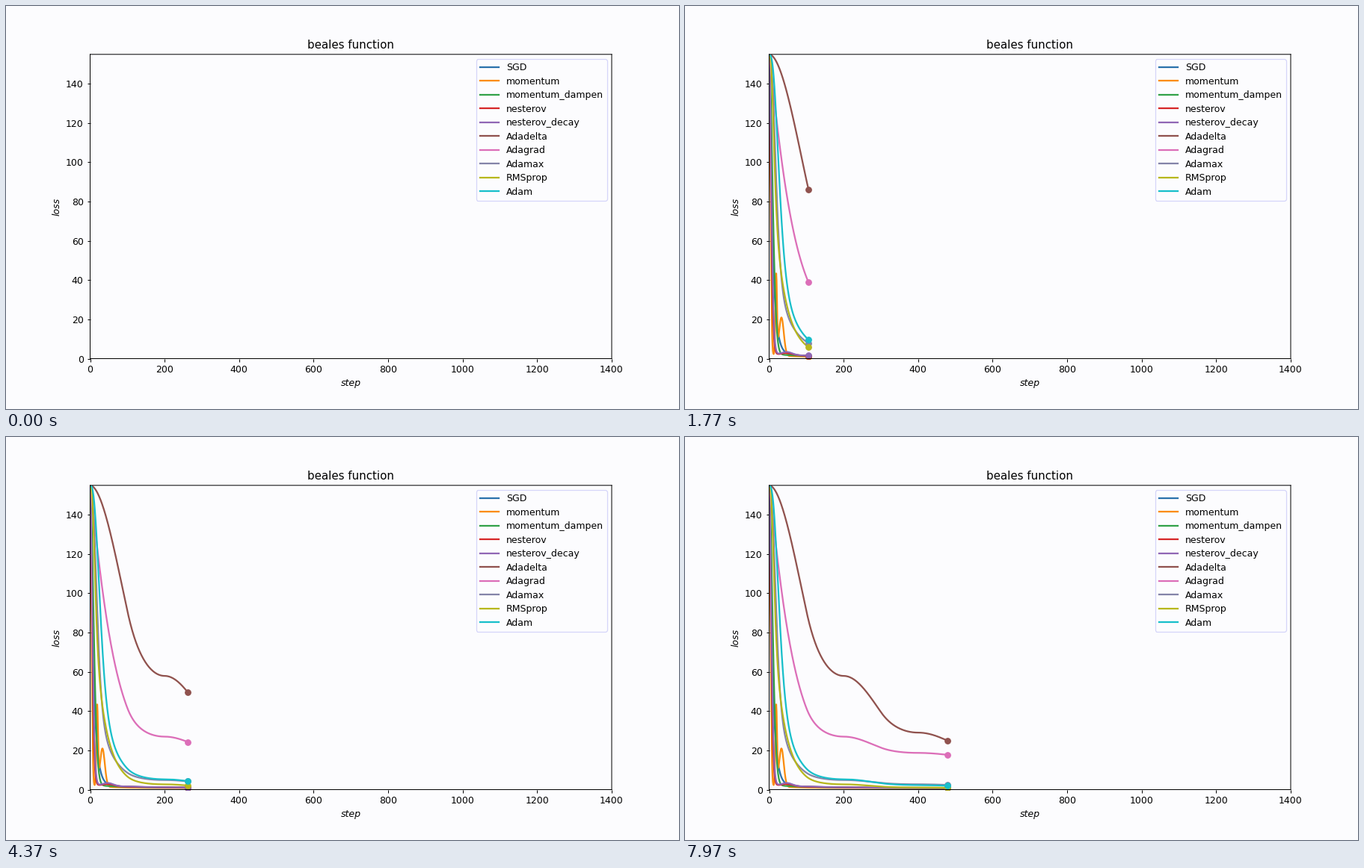
Recreate the animation shown at these times as a matplotlib script. Size 900 by 540 pixels, loop 8000 ms.

```python
import numpy as np
import matplotlib.pyplot as plt
from matplotlib.animation import FuncAnimation

FRAMES = 240
STEPS_PER_FRAME = 2
START = 155
PAPER = "#fcfcfe"

steps = np.arange(FRAMES * STEPS_PER_FRAME + 1)

# Learning rate is a triangle wave of period 200; progress is its integral.
cycle, phase = np.divmod(steps / 200, 1)
progress = cycle + np.where(phase < 0.5, 2 * phase**2, 1 - 2 * (1 - phase)**2)


def adaptive(floor, rate, power, warm=1):
    """Loss that falls with the cyclic learning rate after a short warm-up."""
    ramp = 1 - np.exp(-(steps / warm) ** 2)
    return floor + (START - floor) * np.exp(-rate * progress**power * ramp)


def plunge(scale, power, extra, tail, floor=0.8):
    """Fast fall from the start value onto a slowly sinking floor."""
    rest = floor + extra * np.exp(-steps / tail)
    return rest + (START - floor - extra) * np.exp(-(steps / scale) ** power)


def bump(center, width, height):
    return height * np.exp(-((steps - center) / width) ** 2)


swings = bump(19, 3, 40) + bump(33, 9, 19.5)

curves = [
    ("SGD", "#2a72ac", plunge(9.2, 1, 1.8, 110)),
    ("momentum", "#fb8c0c", plunge(5.2, 2.2, 1.2, 60) + swings),
    ("momentum_dampen", "#32a248", plunge(12.5, 1.8, 1.6, 110)),
    ("nesterov", "#d62728", plunge(6.8, 1.6, 1.4, 140) + bump(48, 22, 1)),
    ("nesterov_decay", "#9067b5",
     plunge(8, 1.7, 1.5, 150) + bump(48, 20, 1.5)),
    ("Adadelta", "#90524e", adaptive(14.5, 1.174, 0.95)),
    ("Adagrad", "#dc6eb8", adaptive(15, 2.457, 0.563)),
    ("Adamax", "#8484a8", adaptive(1, 3.68, 0.29, warm=24)),
    ("RMSprop", "#b7b71c", adaptive(0.6, 4.3, 0.41, warm=14)),
    ("Adam", "#18bfca", adaptive(0.6, 3.5, 0.36, warm=33)),
]

plt.rcParams["font.family"] = "DejaVu Sans"
fig = plt.figure(figsize=(10, 6), dpi=90, facecolor=PAPER)
ax = fig.add_axes([0.125, 0.125, 0.775, 0.755], facecolor=PAPER)
ax.set_xlim(0, 1400)
ax.set_ylim(0, START)
ax.set_title("beales function")
ax.set_xlabel("step", style="italic")
ax.set_ylabel("loss", style="italic")
for spine in ax.spines.values():
    spine.set_snap(False)

lines = [ax.plot([], [], color=color, lw=1.8, label=name)[0]
         for name, color, _ in curves]
dots = [ax.plot([], [], "o", color=color, ms=6)[0] for _, color, _ in curves]
ax.legend(loc="upper right", labelspacing=0.44, facecolor=PAPER,
          edgecolor="#ccccf8")


def draw(i):
    n = i * STEPS_PER_FRAME
    shown = n + 1 if n else 0
    for line, dot, (_, _, loss) in zip(lines, dots, curves):
        line.set_data(steps[:shown], loss[:shown])
        dot.set_data(steps[:shown][-1:], loss[:shown][-1:])
    return lines + dots


anim = FuncAnimation(fig, draw, frames=FRAMES, init_func=lambda: draw(0),
                     interval=8000 / FRAMES, repeat=True, repeat_delay=0)
plt.show()
```
